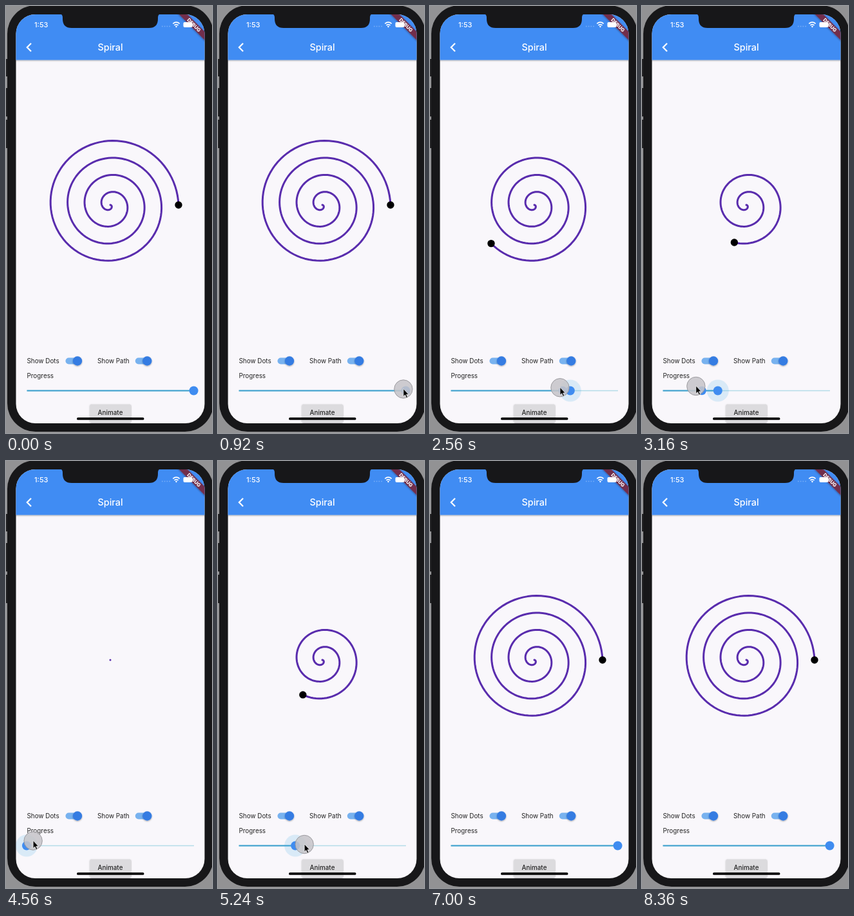
Recreate the animation shown at these times as an HTML page. Size 320 by 661 pixels, loop 8400 ms.

```html
<!DOCTYPE html>
<html lang="en">
<head>
<meta charset="utf-8">
<title>Spiral</title>
<style>
html, body { margin: 0; width: 100%; height: 100%; overflow: hidden; background: #929294; }
svg { display: block; width: 320px; height: 661px; }
text { font-family: Inter, Roboto, sans-serif; font-size: 9.9px; fill: #222; }
.white { fill: #fff; }
.bold { font-weight: 500; }
.line { fill: none; stroke: #fff; }
</style>
</head>
<body>
<svg viewBox="0 0 320 661">
  <defs>
    <clipPath id="screen"><rect x="15.5" y="13" width="293" height="633" rx="30"/></clipPath>
    <filter id="shadow" x="-30%" y="-30%" width="160%" height="180%">
      <feDropShadow dx="0" dy="1" stdDeviation="1.2" flood-opacity=".35"/>
    </filter>
    <g id="switch">
      <rect x="92.5" y="544.5" width="24" height="10" rx="5" fill="#78b2ef"/>
      <circle cx="111" cy="549.5" r="7.2" fill="#357ce2" filter="url(#shadow)"/>
    </g>
  </defs>

  <path d="M0 82h4v27h-4zM0 127h4v44h-4zM0 176h4v44h-4z" fill="#222224"/>
  <rect x="2" y="-1" width="320" height="660" rx="44" fill="#171719"/>

  <g clip-path="url(#screen)">
    <rect x="15" y="13" width="294" height="634" fill="#f9f7fb"/>
    <rect x="10" y="5" width="304" height="78.5" fill="#3f8cf3" filter="url(#shadow)"/>
    <text class="white bold" x="162" y="69" text-anchor="middle" style="font-size:14.4px">Spiral</text>
    <path class="line" d="M39 57.8l-6.2 6.2 6.2 6.2" stroke-width="2.2"/>
    <text class="white bold" x="44" y="33" style="font-size:11px">1:53</text>
    <path d="M242 31.5h14" stroke="#79aff7" stroke-width="1.6" stroke-dasharray="1.6 2.2"/>
    <path class="line" d="M259.3 27.3q5.2-4.4 10.4 0M261.4 29.9q3.1-2.6 6.2 0" stroke-width="1.7"/>
    <path class="white" d="M262.8 31.5q1.7-1.3 3.4 0l-1.7 1.9z"/>
    <g transform="translate(308.5 13) rotate(45)">
      <rect x="-40" y="18.7" width="80" height="9.4" fill="#722f4b" filter="url(#shadow)"/>
      <text class="white" y="26.1" text-anchor="middle" style="font-size:7.6px;font-weight:800">DEBUG</text>
    </g>
    <rect class="white" x="275.5" y="25" width="14" height="8" rx="2"/>

    <path id="spiral" fill="none" stroke="#592cad" stroke-width="3" stroke-linecap="round" stroke-linejoin="round"/>
    <circle id="dot" r="5.7"/>

    <text x="32.5" y="553">Show Dots</text>
    <text x="142" y="553">Show Path</text>
    <text x="32.5" y="576">Progress</text>
    <use href="#switch"/>
    <use href="#switch" x="108.3"/>

    <path d="M32.5 595.5H292" stroke="#b4dce8" stroke-width="1.7"/>
    <path id="track" stroke="#3aa0cd" stroke-width="1.8"/>

    <rect x="130.5" y="616.5" width="63.5" height="28" rx="1.6" fill="#dcdbde" filter="url(#shadow)"/>
    <text class="bold" x="162" y="632.7" text-anchor="middle">Animate</text>
    <rect x="110" y="637" width="104.5" height="3.8" rx="1.9"/>
  </g>
  <path d="M84 12h156q-4 1-4 6v2q0 14-14 14h-120q-14 0-14-14v-2q0-5-4-6z" fill="#171719"/>

  <circle id="halo" cy="595.5" r="17" fill="#3ca5e0" fill-opacity=".17"/>
  <circle id="ghost" cy="595.5" r="6.8" fill="#3f8cf0"/>
  <circle id="thumb" cy="595.5" r="7" fill="#3f8cf0"/>
  <g id="pointer">
    <circle r="14.2" fill="#c5c4c9" fill-opacity=".87" stroke="#969599" stroke-width=".9"/>
    <path d="M0-.5v12l2.7-2.5 2 4.6 2-.9-2-4.4h3.5z" stroke="#fff" stroke-width=".7"/>
  </g>
</svg>
<script>
const LOOP = 8400, LEFT = 32, RIGHT = 291.6, CX = 162, CY = 308, RADIUS = 106, TURNS = 4;
const $ = id => document.getElementById(id);
const set = (id, attrs) => {
  for (const key in attrs) $(id).setAttribute(key, attrs[key]);
};

// Keys are [time, value, ...]
const pointerKeys = [
  [450, 284, 680], [880, 288, 593], [1800, 287, 593], [1920, 286, 594],
  [2500, 214, 591], [3160, 84, 588.5], [3520, 30, 588], [3600, 21, 588],
  [4400, 21, 588], [4440, 24, 588], [4560, 42, 588], [5240, 134, 593.5],
  [6080, 282, 598], [6160, 302, 598], [6440, 342, 598]
];
const thumbKeys = [
  [1840, RIGHT], [1920, 287], [2500, 228], [3160, 118], [3560, LEFT],
  [4570, LEFT], [5240, 120], [6080, 264], [6220, RIGHT]
];

function sample(keys, t) {
  const next = keys.findIndex(k => k[0] > t);
  if (next === 0) return keys[0].slice(1);
  if (next < 0) return keys.at(-1).slice(1);
  const a = keys[next - 1], b = keys[next], u = (t - a[0]) / (b[0] - a[0]);
  return a.slice(1).map((v, i) => v + (b[i + 1] - v) * u);
}

function spiralPoint(turn) {
  const r = RADIUS * turn / TURNS, angle = turn * 2 * Math.PI;
  return [CX + r * Math.cos(angle), CY + r * Math.sin(angle)];
}

function draw(now) {
  const t = now % LOOP;
  const [x] = sample(thumbKeys, t), [px, py] = sample(pointerKeys, t);

  // Progress follows the swept area, so the angle grows with its square root
  const progress = (x - LEFT) / (RIGHT - LEFT), turns = TURNS * Math.sqrt(progress);
  const steps = Math.ceil(turns * 90), points = [];
  for (let i = 0; i <= steps; i++) {
    points.push(spiralPoint(turns * i / Math.max(steps, 1)).map(v => v.toFixed(2)));
  }
  const [dx, dy] = spiralPoint(turns);
  set('spiral', { d: 'M' + points.join('L') + (steps ? '' : 'h.01') });
  set('dot', { cx: dx, cy: dy, opacity: progress > 0 ? 1 : 0 });

  set('track', { d: `M32.5 595.5H${x}` });
  set('thumb', { cx: x });
  set('halo', { cx: x, opacity: Math.max(0, Math.min(1, (t - 1880) / 120, (6420 - t) / 150)) });
  set('ghost', {
    cx: Math.max(LEFT, x + (px - x) * .73),
    opacity: t > 1960 && t < 3560 ? 1 : 0
  });
  set('pointer', { transform: `translate(${px} ${py})` });
  requestAnimationFrame(() => draw(performance.now()));
}
draw(0);
</script>
</body>
</html>
```
